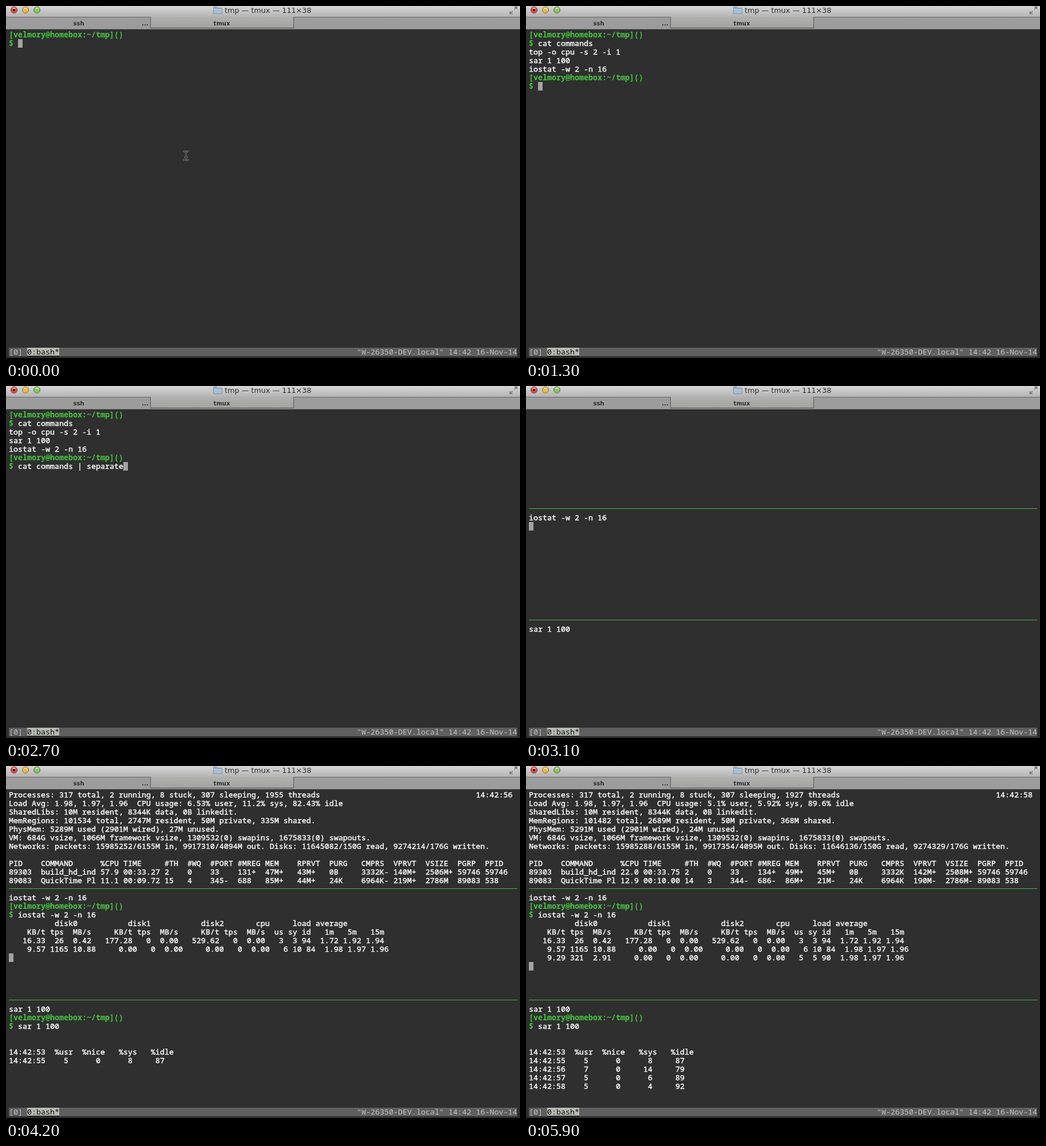
An HTML page for the animation above (6 s loop, 898 px wide and 616 px high).

```html
<!DOCTYPE html>
<html lang="en">
<head>
<meta charset="utf-8">
<title>tmux panes</title>
<style>
  html, body { margin: 0; width: 100%; height: 100%; overflow: hidden; background: #2f2f2f; }
  svg { display: block; }
  .mono { font: 500 13.3333px "Noto Sans Mono", "DejaVu Sans Mono", monospace; }
  .mono text { white-space: pre; }
  #screen text { fill: #fff; stroke: #fff; stroke-width: .4; }
  #screen .prompt { font-weight: 700; fill: #42c83c; stroke: none; }
  .title { font: 12.75px "DejaVu Sans", sans-serif; fill: #2c2c2c; }
  .tab { font: bold 10px "DejaVu Sans", sans-serif; fill: #303030; text-anchor: middle; }
</style>
</head>
<body>
<svg width="898" height="616" viewBox="0 0 898 616">
  <defs>
    <linearGradient id="bar" x2="0" y2="1">
      <stop offset="0" stop-color="#d6d6d6"/><stop offset="1" stop-color="#b2b2b2"/>
    </linearGradient>
    <linearGradient id="active" x2="0" y2="1">
      <stop offset="0" stop-color="#b0b1af"/><stop offset="1" stop-color="#a2a3a1"/>
    </linearGradient>
    <path id="beam" d="M311 254.5H313M316 254.5H318M314.5 255.5V268.5M311 269.5H313M316 269.5H318M313 264.5H316"/>
  </defs>

  <rect width="898" height="616" fill="#2f2f2f"/>
  <rect width="898" height="20" fill="url(#bar)"/>
  <rect y="19" width="898" height="22" fill="#9c9c9c"/>
  <path d="M0 19.5H252.5M502.5 19.5H898" stroke="#686868"/>
  <rect x="252.5" y="19" width="250" height="20" fill="url(#active)"/>
  <path d="M252.5 19V38.5H502.5V19" fill="none" stroke="#555"/>
  <path d="M0 40.5H898" stroke="#777"/>

  <g id="lights"></g>
  <g stroke="#7e94a9">
    <path d="M362.5 13.5V2.5Q362.5 1.5 363.5 1.5H368L370 3.5H377.5V13.5Z" fill="#91a9be"/>
    <path d="M363 5.5H377" stroke="#bccddb"/>
    <rect x="363" y="6" width="14" height="7" fill="#a9bfd2" stroke="none"/>
  </g>
  <text class="title" x="382" y="12">tmp — tmux — 111×38</text>
  <text class="tab" x="127" y="34">ssh</text>
  <text class="tab" x="243" y="34">...</text>
  <text class="tab" x="377" y="34">tmux</text>
  <path d="M888 6L892 2M888 1.5H892.5V6M885 9L881 13M880.5 9V13.5H885" fill="none" stroke="#737373" stroke-width="1.5"/>

  <g id="screen" class="mono"></g>

  <g id="pointer" stroke-linecap="square">
    <use href="#beam" stroke="#888" stroke-width="2.5"/>
    <use href="#beam" stroke="#1c1c1c"/>
  </g>

  <g class="mono">
    <rect x="5" y="598" width="888" height="15" fill="#5f5f5f"/>
    <rect x="37" y="598" width="56" height="15" fill="#b6b9b2"/>
    <text x="5" y="610" fill="#bdbdbd">[0]</text>
    <text x="37" y="610" fill="#111">0:bash*</text>
    <path d="M37 612.5H93" stroke="#111"/>
    <text x="613" y="610" fill="#c4c4c4">"W-26350-DEV.local" 14:42 16-Nov-14</text>
  </g>
</svg>

<script>
const LOOP = 6000, STEP = 100;
const CELL = 8, LINE = 15, LEFT = 5, TOP = 43;
const byId = id => document.getElementById(id);
const screen = byId('screen');

byId('lights').innerHTML = [['#e0504a', '#8d2a26'], ['#ecb648', '#9a7023'], ['#86c260', '#4c7d35']]
  .map(([fill, edge], i) => {
    const x = 14 + 20 * i;
    return `<circle cx="${x}" cy="7" r="5.5" fill="${fill}" stroke="${edge}"/>` +
      `<ellipse cx="${x}" cy="4" rx="3" ry="1.6" fill="#fff" opacity=".55"/>` +
      (i ? '' : `<circle cx="${x}" cy="7" r="2" fill="#4b0d0b"/>`);
  }).join('');

const text = (row, content, col = 0) =>
  `<text x="${LEFT + col * CELL}" y="${TOP + row * LINE + 12}">${content}</text>`;
const lines = (row, list) => list.map((s, i) => text(row + i, s)).join('');
const cursor = (row, col = 0) =>
  `<rect x="${LEFT + col * CELL}" y="${TOP + row * LINE}" width="8" height="15" fill="#a3a3a3"/>`;
const divider = row =>
  `<rect x="5" y="${TOP + row * LINE + 6}" width="888" height="1" fill="#45b445"/>`;
const green = s => `<tspan class="prompt">${s}</tspan>`;
const prompt = (row, command = '') =>
  lines(row, [green('[velmory@homebox:~/tmp]()'), green('$') + ' ' + command]);
const typing = (row, command) => prompt(row, command) + cursor(row + 1, 2 + command.length);

// Value of the latest [time, value] entry reached.
const latest = (entries, t) => entries.filter(e => e[0] <= t).pop()[1];
const reached = (entries, t) => entries.filter(e => e[0] <= t).map(e => e[1]);

const CAT = 'cat commands';
const PIPED = CAT + ' | separate';
const firstTyped = t => Math.min(CAT.length, Math.floor(t / STEP * 1.5));
const secondTyped = t => latest([[0, 0], [1400, 1], [1500, 2], [1700, 7], [1800, 11], [1900, 15],
  [2100, 16], [2200, 17], [2300, 18], [2400, 19], [2500, 20], [2600, 21], [2700, 23]], t);

function shell(t) {
  if (t < 900) return typing(0, CAT.slice(0, firstTyped(t)));
  return prompt(0, CAT) + lines(2, ['top -o cpu -s 2 -i 1', 'sar 1 100', 'iostat -w 2 -n 16']) +
    typing(5, PIPED.slice(0, secondTyped(t)));
}

const WIDTHS = [7, 13, 5, 9, 5, 5, 6, 6, 7, 7, 7, 7, 7, 7, 6, 5];
const columns = row => row.split('|').map((s, i) => s.padEnd(WIDTHS[i])).join('');
const TOP_HEAD = 'PID|COMMAND|%CPU|TIME|#TH|#WQ|#PORT|#MREG|MEM|RPRVT|PURG|CMPRS|VPRVT|VSIZE|PGRP|PPID';

const TOP_VIEWS = [
  [3200, {
    clock: '14:42:53',
    info: ['Processes: 314 total, 2 running, 7 stuck, 305 sleeping, 1937 threads',
      'Load Avg: 1.72, 1.92, 1.94  CPU usage: 14.49% user, 23.91% sys, 61.59% idle',
      'SharedLibs: 9332K resident, 9728K data, 0B linkedit.',
      'MemRegions: 101404 total, 2731M resident, 49M private, 362M shared.',
      'PhysMem: 5292M used (2903M wired), 30M unused.',
      'VM: 677G vsize, 1066M framework vsize, 1309532(0) swapins, 1675833(0) swapouts.',
      'Networks: packets: 15985239/6155M in, 9917297/4094M out. Disks: 11643190/150G read, 9273540/176G written.'],
    tasks: ['89657|top|0.0|00:00.17|1/1|0|19+|41+|2124K+|1912K+|0B|0B|45M+|2404M+|89657|88487',
      '89616|bash|0.0|00:00.00|1|0|19+|35+|652K+|88K+|0B|0B|208K+|2406M+|89616|88486']
  }],
  [4200, {
    clock: '14:42:56',
    info: ['Processes: 317 total, 2 running, 8 stuck, 307 sleeping, 1955 threads',
      'Load Avg: 1.98, 1.97, 1.96  CPU usage: 6.53% user, 11.2% sys, 82.43% idle',
      'SharedLibs: 10M resident, 8344K data, 0B linkedit.',
      'MemRegions: 101534 total, 2747M resident, 50M private, 335M shared.',
      'PhysMem: 5289M used (2901M wired), 27M unused.',
      'VM: 684G vsize, 1066M framework vsize, 1309532(0) swapins, 1675833(0) swapouts.',
      'Networks: packets: 15985252/6155M in, 9917310/4094M out. Disks: 11645082/150G read, 9274214/176G written.'],
    tasks: ['89303|build_hd_ind|57.9|00:33.27|2|0|33|131+|47M+|43M+|0B|3332K-|140M+|2506M+|59746|59746',
      '89083|QuickTime Pl|11.1|00:09.72|15|4|345-|688|85M+|44M+|24K|6964K-|219M+|2786M|89083|538']
  }],
  [5300, {
    clock: '14:42:58',
    info: ['Processes: 317 total, 2 running, 8 stuck, 307 sleeping, 1927 threads',
      'Load Avg: 1.98, 1.97, 1.96  CPU usage: 5.1% user, 5.92% sys, 89.6% idle',
      'SharedLibs: 10M resident, 8344K data, 0B linkedit.',
      'MemRegions: 101482 total, 2689M resident, 50M private, 368M shared.',
      'PhysMem: 5291M used (2901M wired), 24M unused.',
      'VM: 684G vsize, 1066M framework vsize, 1309532(0) swapins, 1675833(0) swapouts.',
      'Networks: packets: 15985288/6155M in, 9917354/4095M out. Disks: 11646136/150G read, 9274329/176G written.'],
    tasks: ['89303|build_hd_ind|22.0|00:33.75|2|0|33|134+|49M+|45M+|0B|3332K|142M+|2508M+|59746|59746',
      '89083|QuickTime Pl|12.9|00:10.00|14|3|344-|686-|86M+|21M-|24K|6964K|190M-|2786M-|89083|538']
  }]
];

const IOSTAT_HEAD = [
  '          disk0           disk1           disk2       cpu     load average',
  '    KB/t tps  MB/s     KB/t tps  MB/s     KB/t tps  MB/s  us sy id   1m   5m   15m'];
const IOSTAT = [
  [3200, '   16.33  26  0.42   177.28   0  0.00   529.62   0  0.00   3  3 94  1.72 1.92 1.94'],
  [4100, '    9.57 1165 10.88     0.00   0  0.00     0.00   0  0.00   6 10 84  1.98 1.97 1.96'],
  [5200, '    9.29 321  2.91     0.00   0  0.00     0.00   0  0.00   5  5 90  1.98 1.97 1.96']];

const sarRow = (second, usr, sys, idle) =>
  `14:42:${second}` + `${usr}`.padStart(5) + '0'.padStart(7) + `${sys}`.padStart(7) + `${idle}`.padStart(7);
const SAR = [
  [3200, '14:42:53  %usr  %nice   %sys   %idle'],
  [4100, sarRow(55, 5, 8, 87)],
  [4700, sarRow(56, 7, 14, 79)],
  [5200, sarRow(57, 5, 6, 89)],
  [5700, sarRow(58, 5, 4, 92)]];

function panes(t) {
  let out = divider(11) + divider(24);
  if (t < 3100) return out + cursor(12);
  out += text(12, 'iostat -w 2 -n 16') + text(25, 'sar 1 100');
  if (t < 3200) return out + cursor(13);

  const view = latest(TOP_VIEWS, t);
  const disk = reached(IOSTAT, t);
  return out + lines(0, view.info) + text(0, view.clock, 102) +
    lines(8, [TOP_HEAD, ...view.tasks].map(columns)) +
    prompt(13, 'iostat -w 2 -n 16') + lines(15, [...IOSTAT_HEAD, ...disk]) + cursor(17 + disk.length) +
    prompt(26, 'sar 1 100') + lines(30, reached(SAR, t));
}

let shown = -1;
function draw(time) {
  const t = Math.floor(time % LOOP / STEP) * STEP;
  if (t !== shown) {
    shown = t;
    screen.innerHTML = t < 3000 ? shell(t) : panes(t);
    byId('pointer').style.display = t < STEP ? '' : 'none';
  }
}

const start = performance.now();
function tick() {
  draw(performance.now() - start);
  requestAnimationFrame(tick);
}
tick();
</script>
</body>
</html>
```
